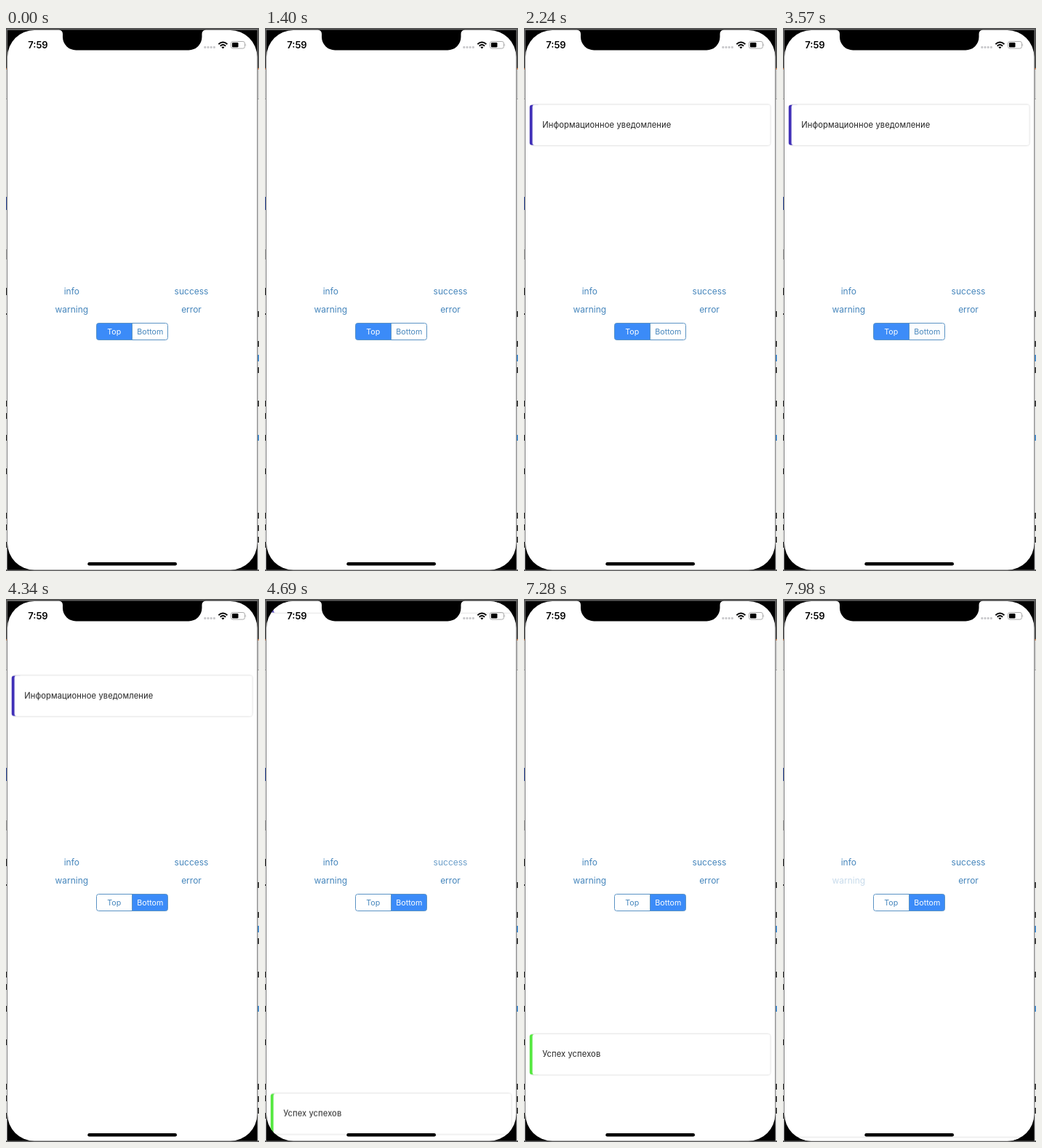
Recreate the animation shown at these times as an HTML page. Size 348x746 px, loop 8000 ms.

```html
<!DOCTYPE html>
<html lang="ru">
<head>
<meta charset="utf-8">
<title>Toast notifications</title>
<style>
  html, body { margin: 0; width: 100%; height: 100%; overflow: hidden; background: #fff; }
  svg { display: block; width: 348px; height: 746px; font-family: Inter, Roboto, sans-serif; }
  .link { font-size: 12px; fill: #4686bc; text-anchor: middle; }
  .seg { font-size: 10.7px; fill: #4686bc; text-anchor: middle; }
  .seg.lit { fill: #fff; }
  .msg { font-size: 11.2px; letter-spacing: .1px; fill: #222; }
  .clock { font-size: 13px; font-weight: 600; }
  .anim { animation: 8s linear infinite; }

  /* percentages are ms / 80 */
  #info { animation-name: info; }
  #success { animation-name: success; }
  #warning { animation-name: warning; }
  #topCard { animation-name: topCard; }
  #bottomCard { animation-name: bottomCard; }
  #nextCard { animation-name: nextCard; }
  .off { animation-name: fadeOut; }
  .on { animation-name: fadeIn; }

  @keyframes info {
    0%, 19.2% { opacity: 1; }
    19.25%, 21% { opacity: .3; }
    24%, 100% { opacity: 1; }
  }
  @keyframes success {
    0%, 55.1% { opacity: 1; }
    55.12%, 56.5% { opacity: .3; }
    59.5%, 100% { opacity: 1; }
  }
  @keyframes warning {
    0%, 98.8% { opacity: 1; }
    98.85%, 100% { opacity: .3; }
  }
  @keyframes topCard {
    0% { transform: translateY(-170px); }
    19.9% { transform: translateY(-170px); animation-timing-function: ease-in-out; }
    27.4% { transform: none; }
    54.1% { transform: none; animation-timing-function: ease-in-out; }
    60.4%, 100% { transform: translateY(-170px); }
  }
  @keyframes bottomCard {
    0% { transform: translateY(154px); }
    55.5% { transform: translateY(154px); animation-timing-function: ease-in-out; }
    62.1% { transform: none; }
    90.5% { transform: none; animation-timing-function: ease-in-out; }
    96.9%, 100% { transform: translateY(154px); }
  }
  @keyframes nextCard {
    0%, 98.6% { transform: translateY(154px); }
    100% { transform: translateY(141px); }
  }
  @keyframes fadeOut {
    0%, 44.6% { opacity: 1; }
    48.1%, 100% { opacity: 0; }
  }
  @keyframes fadeIn {
    0%, 44.6% { opacity: 0; }
    48.1%, 100% { opacity: 1; }
  }
</style>
</head>
<body>
<svg viewBox="0 0 348 746">
  <defs>
    <clipPath id="screen"><rect x="2" y="3" width="343.5" height="741.5" rx="37"/></clipPath>
    <filter id="soft" x="-5%" y="-20%" width="110%" height="140%"><feGaussianBlur stdDeviation="1.1"/></filter>
    <g id="panel">
      <rect x="8.5" y="0" width="330.5" height="56.5" rx="4" fill="#000" opacity=".17" filter="url(#soft)"/>
      <rect x="7.8" y=".8" width="14" height="55" rx="3" fill="currentColor"/>
      <rect x="11.6" y=".5" width="327" height="55.5" rx="3" fill="#fff"/>
    </g>
  </defs>

  <!-- page behind the phone -->
  <rect width="348" height="746" fill="#f4f4f4"/>
  <rect width="348" height="55" fill="#484848"/>
  <rect y="55" width="348" height="2" fill="#d98a5c"/>
  <rect y="57" width="348" height="40" fill="#dedede"/>
  <rect y="97" width="348" height="1" fill="#aaa"/>
  <rect y="232" width="2" height="18" fill="#3d58a8"/>
  <rect y="304" width="2" height="14" fill="#aaa"/>
  <g stroke="#333" stroke-width="2">
    <path d="M1 357v10M1 392v2M1 512v8M1 529v8M1 559v8M1 605v8M1 666v8M1 682v8M1 706v8"/>
    <path d="M347 389v8M347 430v8M347 466v8M347 512v8M347 666v8M347 683v8M347 699v8"/>
    <path d="M347 449v9M347 559v8" stroke="#3f8fdb"/>
  </g>

  <!-- phone body -->
  <path d="M0 0H348V3H0zM0 744H348V746H0z" fill="#555"/>
  <rect x="1.5" y="2.5" width="344.5" height="742.5" stroke="#777"/>
  <rect x="2" y="3" width="343.5" height="741.5" rx="37" fill="#fff"/>

  <g clip-path="url(#screen)">
    <text id="info" class="link anim" x="90.3" y="366">info</text>
    <text id="success" class="link anim" x="255" y="366">success</text>
    <text id="warning" class="link anim" x="90.3" y="391">warning</text>
    <text class="link" x="255" y="391">error</text>

    <text class="seg" x="148.7" y="421">Top</text>
    <text class="seg" x="198.3" y="421">Bottom</text>
    <g class="anim off">
      <path d="M173.5 405.5H127.5a3 3 0 0 0-3 3v17a3 3 0 0 0 3 3H173.5z" fill="#3b8bf8"/>
      <text class="seg lit" x="148.7" y="421">Top</text>
    </g>
    <g class="anim on">
      <path d="M173.5 405.5H219.5a3 3 0 0 1 3 3v17a3 3 0 0 1-3 3H173.5z" fill="#3b8bf8"/>
      <text class="seg lit" x="198.3" y="421">Bottom</text>
    </g>
    <g fill="none" stroke="#5b93c4">
      <path d="M173.5 405.5v23"/>
      <rect x="124.5" y="405.5" width="98" height="23" rx="3"/>
    </g>

    <g id="topCard" class="anim">
      <use href="#panel" y="105" color="#4030b8"/>
      <text class="msg" x="25.2" y="137">Информационное уведомление</text>
    </g>
    <g id="bottomCard" class="anim">
      <use href="#panel" y="595.5" color="#55e840"/>
      <text class="msg" x="25.2" y="627.3">Успех успехов</text>
    </g>
    <g id="nextCard" class="anim">
      <use href="#panel" y="596.5" color="#f5a623"/>
    </g>
  </g>

  <!-- notch, status bar, home indicator -->
  <path d="M72.5 2.5A5.5 5.5 0 0 1 78 8V12.2A18.3 18.3 0 0 0 96.3 30.5H251.2A18.3 18.3 0 0 0 269.5 12.2V8A5.5 5.5 0 0 1 275 2.5z"/>
  <text class="clock" x="30.2" y="28.2">7:59</text>
  <g fill="#c9c9cc">
    <rect x="272.3" y="25" width="3" height="3" rx="1"/>
    <rect x="276.5" y="25" width="3" height="3" rx="1"/>
    <rect x="280.7" y="25" width="3" height="3" rx="1"/>
    <rect x="284.9" y="25" width="3" height="3" rx="1"/>
  </g>
  <path d="M292.4 22.2Q298.4 16.9 304.4 22.2M294.7 24.7Q298.4 21.4 302.1 24.7" fill="none" stroke="#000" stroke-width="1.9"/>
  <path d="M296.4 26.3Q298.4 24.7 300.4 26.3L298.4 28.4z"/>
  <rect x="309.5" y="18.5" width="19" height="9.6" rx="2.6" fill="none" stroke="#aaa"/>
  <rect x="311" y="20" width="8.5" height="6.6" rx="1.3"/>
  <path d="M329.6 21.6q1.5 1.7 0 3.4z" fill="#999"/>
  <rect x="112.3" y="734" width="122.7" height="4.5" rx="2.2"/>
</svg>
</body>
</html>
```
